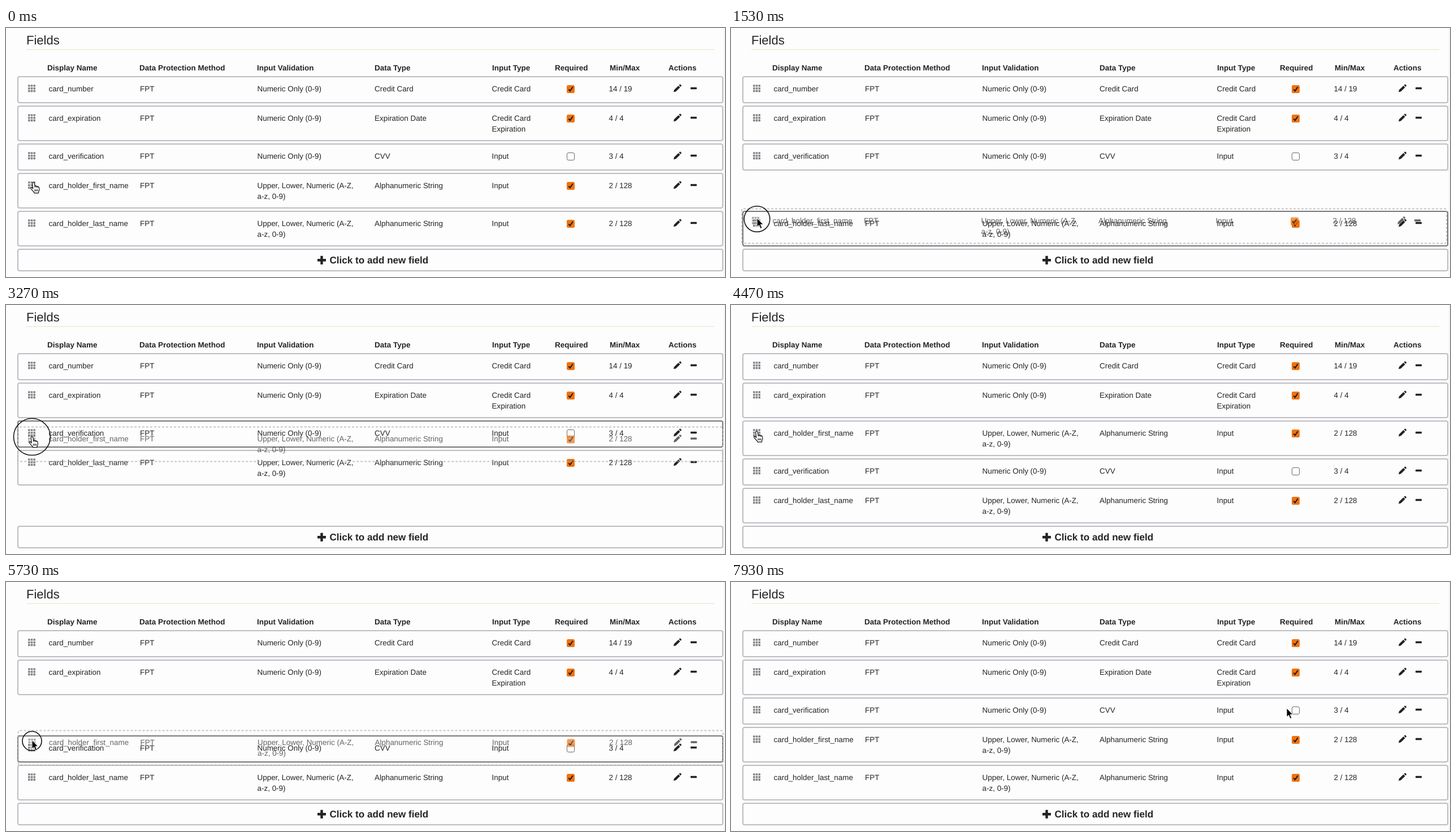
These frames come from a looping animation (1272x440 px, 8 s). An HTML page:

```html
<!DOCTYPE html>
<html lang="en">
<head>
<meta charset="utf-8">
<title>Sortable fields</title>
<style>
  html, body { margin: 0; width: 100%; height: 100%; overflow: hidden; background: #fdfdfd; }
  svg { display: block; width: 1272px; height: 440px; }
  text { font: 13.45px "Liberation Sans", Arial, sans-serif; fill: #242424; text-rendering: geometricPrecision; }
  .title { font-size: 22px; }
  .head { font-size: 13.5px; font-weight: bold; }
  .add { font-size: 17.1px; font-weight: bold; }
  .box { fill: none; stroke: #bdbdc3; stroke-width: 2; }
  .over .box { stroke: #76767a; }
  .drag { opacity: .7; }
  .drag .box { stroke: #b0b0b0; stroke-dasharray: 4 3; }
  #ring { fill: none; stroke: #111; stroke-width: 1.6; }
</style>
</head>
<body>
<svg id="stage" viewBox="0 0 1272 440">
  <defs>
    <g id="grip" fill="#85858b"></g>
    <g id="on">
      <rect x="-7" y="-7" width="14" height="14" rx="2.5" fill="#f0730f"/>
      <path d="M-3.8 .4L-1.2 3.3L3.8 -3.9" fill="none" stroke="#1d1d1d" stroke-width="2.1"/>
    </g>
    <rect id="off" x="-6.5" y="-6.5" width="13" height="13" rx="2.5" fill="#fff" stroke="#6b6b6b"/>
    <g id="pencil" fill="#222">
      <path d="M-7 6.8L-5.9 2.7L1.6 -4.6L4.6 -1.6L-2.9 5.8Z"/>
      <path d="M2.5 -5.4L4 -6.8Q4.8 -7.2 5.6 -6.5L6.7 -5.3Q7.2 -4.6 6.6 -3.8L5.4 -2.5Z"/>
    </g>
    <rect id="minus" x="-5.5" y="-1.7" width="11" height="3.4" rx=".8" fill="#222"/>
  </defs>
  <text class="title" x="36" y="29">Fields</text>
  <rect x="36" y="37.5" width="1217" height="1" fill="#e2e4c2"/>
  <rect x="1270" width="1" height="440" fill="#ececee"/>
  <g id="heads"></g>
  <rect class="box" x="21" y="391" width="1247" height="38" rx="3"/>
  <path d="M551 410.3h15M558.5 402.8v15" stroke="#222" stroke-width="4.4"/>
  <text class="add" x="572.5" y="416.3">Click to add new field</text>
  <g id="rows"></g>
  <circle id="ring"/>
  <g id="cursor">
    <g id="hand" stroke="#111" stroke-width="1.2" stroke-linejoin="round">
      <path fill="#fff" d="M-1.8 1.5Q-1.5 -.5 .2 -.3Q1.6 0 1.9 2L2.6 6.6Q3.8 5.4 5 6.6Q6.4 5.8 7.4 7.4Q9.4 7 10 9L10.4 12.5Q10.3 14.5 9 16.5V18.6H1.4L1 17Q-2 14 -4.4 10.8Q-5.4 9 -4 8.6Q-2.6 8.6 -.8 10.8Z"/>
      <path fill="none" d="M2.6 6.6L2.9 8.6M5 6.6L5.3 8.8M7.4 7.4L7.6 9.2M2.6 12.2V15.4M4.9 12.2V15.4M7.2 12.2V15.4"/>
    </g>
    <path id="arrow" d="M0 -1.5V14L3.6 10.7L6.3 17L9 15.8L6.3 9.7H11Z" fill="#000" stroke="#fff"/>
    <g id="beam" fill="none">
      <path d="M-3.5 -8Q0 -8 0 -5.5Q0 -8 3.5 -8M0 -6V6M-3.5 8Q0 8 0 5.5Q0 8 3.5 8M-2 2H2" stroke="#fff" stroke-width="3"/>
      <path d="M-3.5 -8Q0 -8 0 -5.5Q0 -8 3.5 -8M0 -6V6M-3.5 8Q0 8 0 5.5Q0 8 3.5 8M-2 2H2" stroke="#111" stroke-width="1.3"/>
    </g>
  </g>
</svg>
<script>
const LOOP = 8000, TOP = 85, RING = 32.5;
const $ = id => document.getElementById(id);

const text = (x, y, s, cls = '') => `<text class="${cls}" x="${x}" y="${y}">${s}</text>`;
const icon = (id, x, y) => `<use href="#${id}" x="${x}" y="${y}"/>`;

$('grip').innerHTML = [...Array(9).keys()].map(i =>
  `<rect x="${(i % 3) * 4.7 - 6.5}" y="${(i / 3 | 0) * 4.7 - 6.5}" width="3.6" height="3.6" rx=".6"/>`).join('');

$('heads').innerHTML = [
  [73, 'Display Name'], [236, 'Data Protection Method'], [444, 'Input Validation'], [652, 'Data Type'],
  [860, 'Input Type'], [971, 'Required'], [1068, 'Min/Max'], [1172, 'Actions']
].map(([x, s]) => text(x, 75, s, 'head')).join('');

const digits = ['Numeric Only (0-9)'];
const mixed = ['Upper, Lower, Numeric (A-Z,', 'a-z, 0-9)'];

// The draggable "first" row comes last so that it paints above the others.
const fields = {
  number: ['card_number', digits, 'Credit Card', ['Credit Card'], 'on', '14 / 19'],
  expiry: ['card_expiration', digits, 'Expiration Date', ['Credit Card', 'Expiration'], 'on', '4 / 4'],
  code: ['card_verification', digits, 'CVV', ['Input'], 'off', '3 / 4'],
  last: ['card_holder_last_name', mixed, 'Alphanumeric String', ['Input'], 'on', '2 / 128'],
  first: ['card_holder_first_name', mixed, 'Alphanumeric String', ['Input'], 'on', '2 / 128']
};

const rows = {};
for (const [key, [name, rule, type, input, check, range]] of Object.entries(fields)) {
  const tall = rule.length > 1 || input.length > 1;
  const h = tall ? 63 : 48;
  const lines = (x, list) => list.map((s, i) => text(x, 26.6 + i * 19.2, s)).join('');
  const el = document.createElementNS('http://www.w3.org/2000/svg', 'g');
  el.innerHTML = `<rect class="box" x="21" y="1" width="1247" height="${h - 2}" rx="3"/>` +
    icon('grip', 45.5, 21.7) + lines(75.5, [name]) + lines(237, ['FPT']) + lines(444.5, rule) +
    lines(652, [type]) + lines(859.5, input) + icon(check, 999, 23) + lines(1066.5, [range]) +
    icon('pencil', 1188, 21.5) + icon('minus', 1216.5, 21.5);
  $('rows').append(el);
  rows[key] = { el, h, step: tall ? 67 : 52 };
}

// Each drag: press, release and drop times, then the order it leaves behind.
const home = ['number', 'expiry', 'code', 'first', 'last'];
const drags = [
  { press: 890, release: 1480, drop: 1620, order: ['number', 'expiry', 'code', 'last', 'first'] },
  { press: 2690, release: 3600, drop: 3720, order: ['number', 'expiry', 'first', 'code', 'last'] },
  { press: 4700, release: 5650, drop: 5770, order: home }
];

// Pointer path: time, x, y.
const path = [
  [0, 48.5, 273], [600, 48, 275], [950, 48, 275], [1450, 46, 337.5], [1720, 46, 337.5],
  [2000, 46, 341.5], [2780, 46, 341.5], [3270, 46, 233], [3560, 45.5, 223.5], [4800, 45.5, 223.5],
  [5400, 46, 277.5], [5600, 46, 281], [5950, 46, 281], [6550, 565, 165], [6900, 565, 165],
  [7750, 983, 224.5], [LOOP, 983, 224.5]
];

function pointer(t) {
  const i = path.findIndex(p => p[0] > t);
  const [t0, x0, y0] = path[i - 1], [t1, x1, y1] = path[i];
  const u = (t - t0) / (t1 - t0), k = u * u * (3 - 2 * u);
  return [x0 + (x1 - x0) * k, y0 + (y1 - y0) * k];
}

function shape(t) {
  if (t > 6450 && t < 6960) return 'beam';
  if (t > 6000 || drags.some(d => t >= d.release && t < d.drop + 100)) return 'arrow';
  return 'hand';
}

function ringSize(t) {
  const d = drags.find(d => t >= d.press && t < d.release + 170);
  if (!d) return 0;
  return RING * (t < d.release ? Math.min(1, (t - d.press) / 110) : 1 - (t - d.release) / 170);
}

function draw(t) {
  const [x, y] = pointer(t);
  const order = drags.reduce((o, d) => t >= d.drop ? d.order : o, home);
  const drag = drags.find(d => t >= d.press + 100 && t < d.drop);
  let top = TOP;
  for (const key of order) {
    const { el, h, step } = rows[key];
    const held = drag && key === 'first';
    let dx = 0, dy = 0;
    if (held) {
      const [px, py] = pointer(drag.press);
      dx = x - px;
      dy = y - py;
    }
    el.setAttribute('transform', `translate(${dx} ${top + dy})`);
    el.classList.toggle('drag', !!held);
    el.classList.toggle('over', !!drag && !held && y > top && y < top + h);
    top += step;
  }
  const now = shape(t);
  for (const id of ['hand', 'arrow', 'beam']) $(id).style.display = id === now ? '' : 'none';
  $('cursor').setAttribute('transform', `translate(${x} ${y})`);
  const r = ringSize(t);
  $('ring').style.display = r > 1 ? '' : 'none';
  $('ring').setAttribute('r', r);
  $('ring').setAttribute('cx', x);
  $('ring').setAttribute('cy', y);
}

const start = performance.now();
function tick() {
  draw((performance.now() - start) % LOOP);
  requestAnimationFrame(tick);
}
tick();
</script>
</body>
</html>
```
